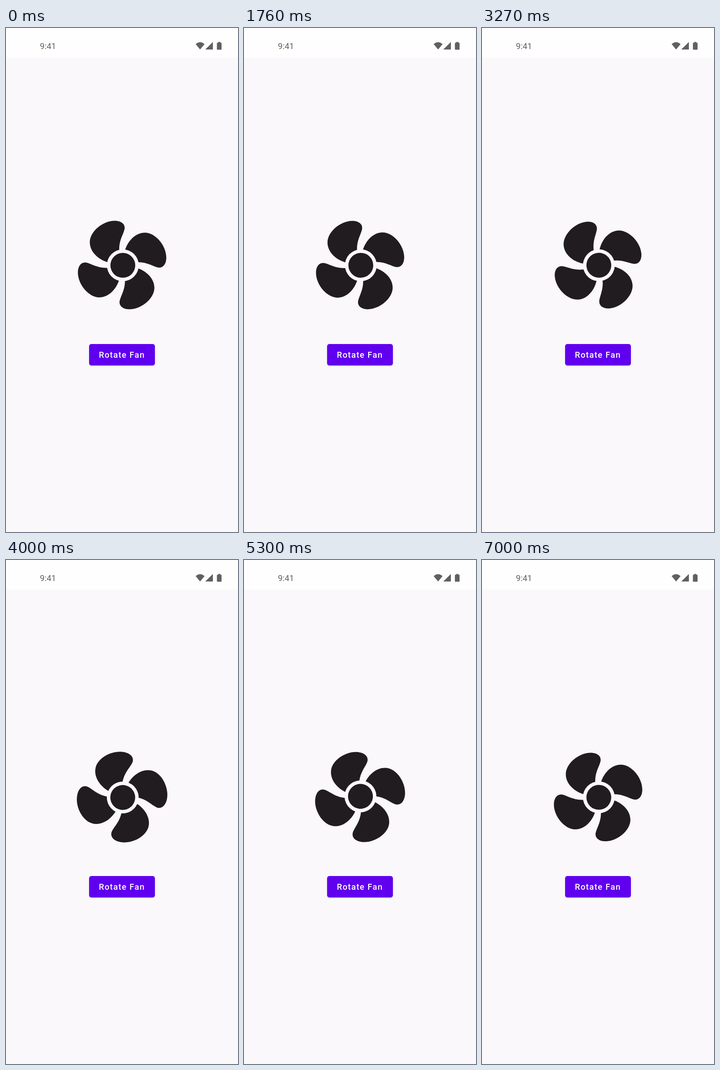
Write an HTML page that moves like this. It is 508 px wide and 1102 px high and loops after 7.09 s.

```html
<!DOCTYPE html>
<html lang="en">
<head>
<meta charset="utf-8">
<title>Rotate Fan</title>
<style>
  html, body { margin: 0; width: 100%; height: 100%; overflow: hidden; background: #faf8fb; }
  svg { display: block; width: 508px; height: 1102px; }
  text { font-family: Roboto, sans-serif; }
</style>
</head>
<body>
<svg viewBox="0 0 508 1102">
  <rect width="508" height="1102" fill="#faf8fb"/>
  <rect width="508" height="64" fill="#fefefe"/>

  <g fill="#606063">
    <text x="74.3" y="46.3" font-size="18.3">9:41</text>
    <path d="M415.3 35.2Q425 26.7 434.8 35.2L425 47Z"/>
    <path d="M453 30.6V47H436.4Z"/>
    <path d="M464.6 32.2V30.6H469.4V32.2H470.8Q472 32.2 472 33.4V46.2Q472 47.4 470.8 47.4H463Q461.8 47.4 461.8 46.2V33.4Q461.8 32.2 463 32.2Z"/>
  </g>

  <g id="fan" fill="#201c20">
    <g id="blades"></g>
    <circle cx="255.8" cy="518.9" r="34.8" fill="#fbf9fc"/>
    <circle cx="255.8" cy="518.9" r="27.2"/>
  </g>

  <rect id="button" x="182" y="691" width="144" height="46.7" rx="5" fill="#6000ee"/>
  <text x="203.2" y="721.3" font-size="18.3" font-weight="500" letter-spacing="1.3" fill="#fff">Rotate Fan</text>
</svg>
<script>
  const LOOP = 7090;
  const SPIN_END = 5792, SPIN_TIME = 5050, REST = 5760;
  const PIVOT = '254.2 518.3';
  const BLADE = 'M222 512C200 505 183.5 488 183.5 468.5C183.5 445 212 421.5 238 421.5' +
    'C252 421.5 261 428.5 259.7 439C257.5 451 247 464 248 486Z';

  const fan = document.getElementById('fan');
  const button = document.getElementById('button');

  document.getElementById('blades').innerHTML = [0, 90, 180, 270]
    .map(a => `<path d="${BLADE}" transform="rotate(${a} ${PIVOT})"/>`).join('');

  const clamp01 = v => Math.max(0, Math.min(1, v));

  // One full turn with an elastic ease-in: swings grow until the fan whips round.
  function fanAngle(t) {
    const u = 10 * (t - SPIN_END) / SPIN_TIME;
    if (u <= -10 || t >= REST) return 0;
    return -360 * 2 ** u * Math.sin((u - 0.75) * 2 * Math.PI / 3);
  }

  // The button lifts briefly while it is pressed.
  const lift = t => clamp01((t - 670) / 110) * clamp01((1010 - t) / 150);

  function draw() {
    const t = performance.now() % LOOP;
    const h = lift(t);
    fan.setAttribute('transform', `rotate(${fanAngle(t)} ${PIVOT})`);
    button.style.filter = `drop-shadow(0 ${1.6 + 2 * h}px ${1.2 + 1.5 * h}px rgba(0,0,0,.24))`;
    requestAnimationFrame(draw);
  }
  draw();
</script>
</body>
</html>
```
